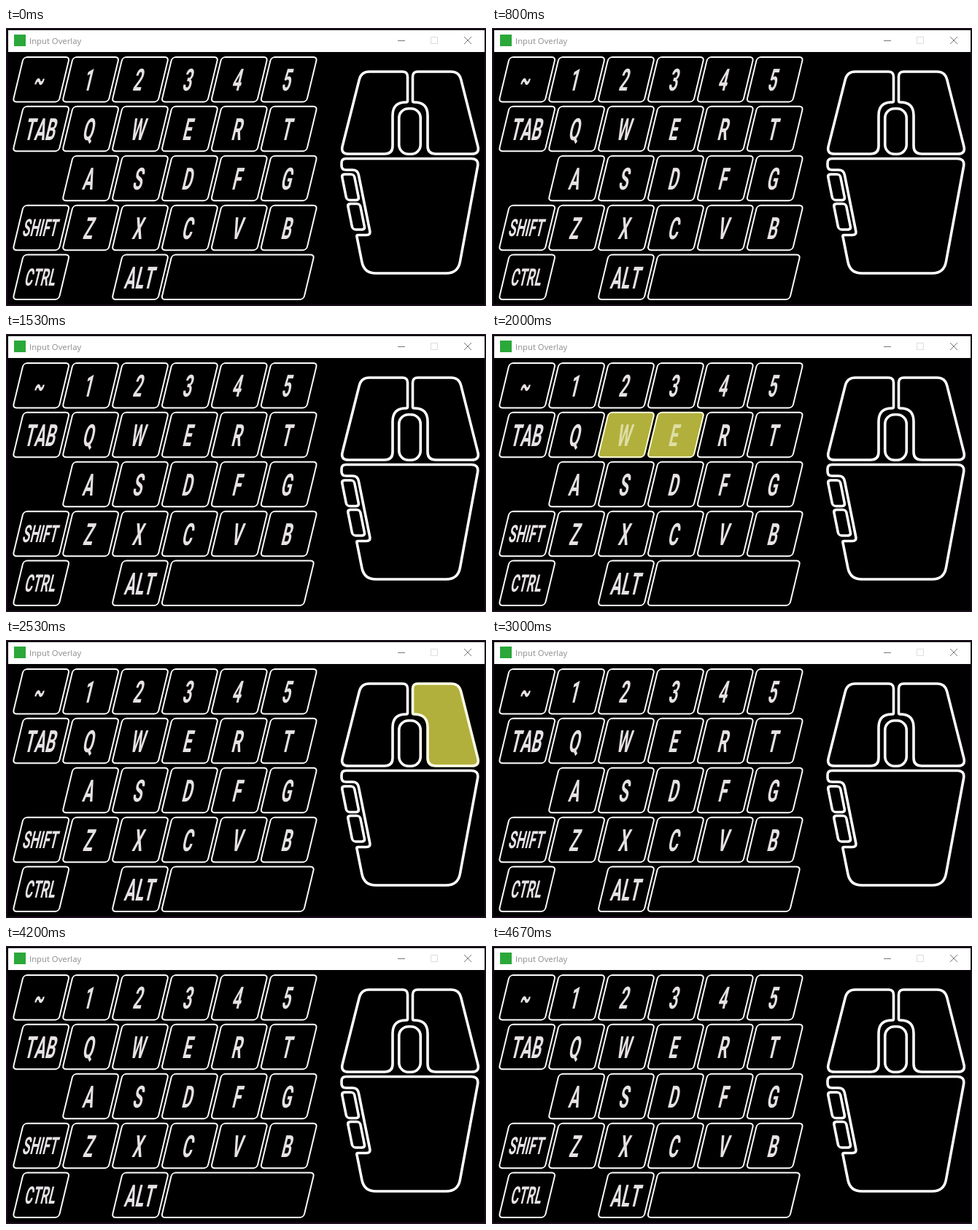
An HTML page that plays this animation: 658x382 px, repeating every 4.74 s.

```html
<!DOCTYPE html>
<html lang="en">
<head>
<meta charset="utf-8">
<title>Input Overlay</title>
<style>
  html, body { margin: 0; width: 100%; height: 100%; overflow: hidden; background: #000; }
  svg { display: block; width: 658px; height: 382px; }
  .title { font: 11.3px "Open Sans", sans-serif; fill: #8c8c8c; }
  .key rect { fill: #000; stroke: #fff; stroke-width: 2; }
  .key text { font: 700 42px Roboto, sans-serif; font-kerning: none; fill: #e6e1e5; text-anchor: middle; }
  .key .small { font-size: 33px; }
  .mouse { fill: #000; stroke: #fff; stroke-width: 3.6; }
  .typed rect, .clicked { animation: press 4740ms step-end infinite; }
  .typed text { animation: glow 4740ms step-end infinite; }
  .clicked { animation-name: click; }
  /* keys down 1800-2200 ms, right button down 2400-2670 ms */
  @keyframes press { 0%, 46.414% { fill: #000; stroke: #fff; } 37.975% { fill: #b2b03c; stroke: #ffffe0; } }
  @keyframes glow { 0%, 46.414% { fill: #e6e1e5; } 37.975% { fill: #dedea6; } }
  @keyframes click { 0%, 56.329% { fill: #000; stroke: #fff; } 50.633% { fill: #b2b03c; stroke: #ffffe8; } }
</style>
</head>
<body>
<svg viewBox="0 0 658 382">
  <rect width="658" height="382" fill="#1c0f1e"/>
  <rect x="2" y="2" width="654" height="378"/>
  <rect x="3" y="3" width="653" height="30" fill="#fff"/>
  <rect x="11" y="9" width="16" height="16" fill="#2aa83a"/>
  <text class="title" x="32" y="22">Input Overlay</text>
  <g fill="none" stroke="#777">
    <path d="M537 17.5h10"/>
    <path d="M582.5 12.5h9v9h-9z" stroke="#ddd"/>
    <path d="M628 12l10 10m0-10l-10 10"/>
  </g>
  <g id="keys"></g>
  <g id="mouse" class="mouse" transform="translate(554)"></g>
</svg>
<script>
  const rows = ["~ 1 2 3 4 5", "TAB Q W E R T", "_ A S D F G", "SHIFT Z X C V B", "CTRL _ ALT"];
  const pitch = 67.9, slant = "skewX(-13.5)";

  // A slanted rounded box centred on x, y.
  const box = (x, y, w, h, r, skew) =>
    `<rect x="${-w / 2}" y="${-h / 2}" width="${w}" height="${h}" rx="${r}" transform="translate(${x} ${y}) ${skew}"/>`;

  function key(col, row, label, width = 63) {
    const x = 48.2 + col * pitch, y = 70.7 + row * pitch;
    const small = label.length > 3;
    const textX = x - (label.length > 1 ? 3 : 5);
    const textY = y + (small ? 12 : 15.5);
    return `<g class="key ${/^[WE]$/.test(label) ? "typed" : ""}">
      ${box(x, y, width, 61.5, 5, slant)}
      <text class="${small ? "small" : ""}" transform="translate(${textX} ${textY}) ${slant} scale(.52 1)">${label}</text>
    </g>`;
  }

  // Closed polygon with rounded corners; each point is [x, y, radius].
  function rounded(points) {
    const toward = ([x, y, r = 11], [u, v]) => {
      const t = r / Math.hypot(u - x, v - y);
      return [x + (u - x) * t, y + (v - y) * t];
    };
    return points.map((p, i) => {
      const from = toward(p, points.at(i - 1));
      const to = toward(p, points[(i + 1) % points.length]);
      return `${i ? "L" : "M"}${from}Q${p[0]} ${p[1]} ${to}`;
    }).join("") + "Z";
  }
  const shape = (points, attrs = "") => `<path d="${rounded(points)}" ${attrs}/>`;

  document.getElementById("keys").innerHTML = rows.map((row, r) =>
    row.split(" ").map((label, c) => label === "_" ? "" : key(c, r, label)).join("")
  ).join("") + key(3.97, 4, "", 195);

  // Mouse coordinates run from its vertical axis.
  const button = [[-67, 60], [-3.5, 60, 7], [-3.5, 102, 2], [-24, 102, 18], [-24, 173], [-95.5, 173]];
  const edge = y => -72 + (y - 195) * 0.2;
  const body = [
    [-94, 179.5, 6], [94.5, 179.5], [65.5, 337, 16], [-63, 337, 16],
    [-73.5, 284.5, 2], [edge(284.5), 284.5, 6], [edge(195), 195, 7], [-94, 195, 6]
  ];

  document.getElementById("mouse").innerHTML =
    shape(button) +
    shape(button, 'class="clicked" transform="scale(-1 1)"') +
    box(-0.5, 142, 29.5, 62.5, 13, "") +
    shape(body) +
    [218.7, 259.2].map(y => box(edge(y) - 14.7, y, 17, 35.5, 4, "skewX(11.3)")).join("");
</script>
</body>
</html>
```
